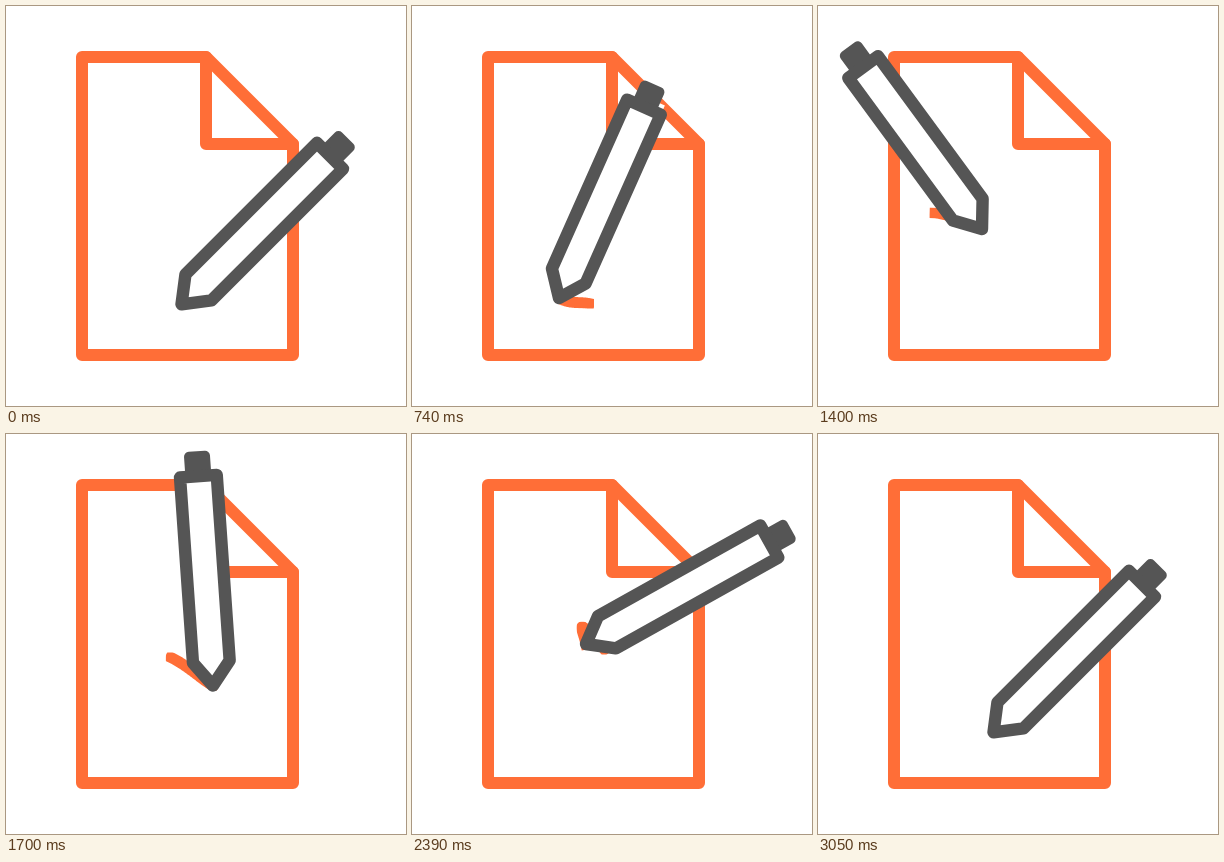
These frames come from a looping animation (400x400 px, 3.08 s). An HTML page with a canvas:

```html
<!DOCTYPE html>
<html>
<head>
<meta charset="utf-8">
<style>
html, body { margin: 0; width: 100%; height: 100%; overflow: hidden; background: #fff; }
canvas { display: block; width: 400px; height: 400px; }
</style>
</head>
<body>
<canvas id="stage" width="400" height="400"></canvas>
<script>
const ctx = document.getElementById('stage').getContext('2d');
const ORANGE = '#ff6e37', GREY = '#555';
const LOOP = 3080, START = 530, END = 3050, STEP = 30;
const INK_LENGTH = 50, INK_WIDTH = 11, INK_MARGIN = 5;

// turning points of the pen: time, tip x, tip y, angle in degrees
const keys = [
  [START, 177, 297.6, 45.2],
  [740, 147, 292, 66],
  [920, 121.5, 264, 87.7],
  [1050, 107, 233, 104],
  [1180, 112, 207, 115],
  [1400, 164, 223, 126.3],
  [1730, 209, 252, 90],
  [2000, 198, 223, 47.5],
  [2210, 171, 193, 33],
  [2390, 174, 210, 29.2],
  [2560, 181, 243, 28.4],
  [2780, 168, 290, 33],
  [END, 175.5, 298.3, 45]
];

function slope(i, c) {
  const a = keys[Math.max(i - 1, 0)], b = keys[Math.min(i + 1, keys.length - 1)];
  return (b[c] - a[c]) / (b[0] - a[0]);
}

// smooth curve through the keys, gives [x, y, angle]
function pose(t) {
  let i = 0;
  while (i < keys.length - 2 && t >= keys[i + 1][0]) i++;
  const a = keys[i], b = keys[i + 1], d = b[0] - a[0];
  const u = (t - a[0]) / d, u2 = u * u, u3 = u2 * u;
  return [1, 2, 3].map(c =>
    a[c] * (2 * u3 - 3 * u2 + 1) + b[c] * (3 * u2 - 2 * u3)
    + d * (slope(i, c) * (u3 - 2 * u2 + u) + slope(i + 1, c) * (u3 - u2)));
}

// the barrel is foreshortened while the pen leans left
function barrel(t) {
  return 186 - 26 * Math.exp(-(((t - 1160) / 235) ** 2));
}

function trace(points, close) {
  ctx.beginPath();
  points.forEach(([x, y]) => ctx.lineTo(x, y));
  if (close) ctx.closePath();
}

function drawPage() {
  ctx.strokeStyle = ORANGE;
  ctx.lineWidth = 12;
  ctx.lineCap = ctx.lineJoin = 'round';
  trace([[76, 51], [200, 51], [287, 138], [287, 349], [76, 349]], true);
  ctx.stroke();
  trace([[200, 51], [200, 138], [287, 138]]);
  ctx.stroke();
}

// the last stretch of the tip's path, cut off by its own bounding box
function drawInk(t) {
  const limit = Math.min(INK_LENGTH, (END - t) * 0.2);
  const points = [pose(t)];
  let length = 0;
  for (let s = t - 5; s >= START && length < limit; s -= 5) {
    const [px, py] = points[points.length - 1], p = pose(s);
    length += Math.hypot(p[0] - px, p[1] - py);
    points.push(p);
  }
  if (points.length < 2) return;
  const xs = points.map(p => p[0]), ys = points.map(p => p[1]);
  const left = Math.min(...xs) - INK_MARGIN, top = Math.min(...ys) - INK_MARGIN;
  ctx.save();
  ctx.beginPath();
  ctx.rect(left, top, Math.max(...xs) + INK_MARGIN - left, Math.max(...ys) + INK_MARGIN - top);
  ctx.clip();
  ctx.strokeStyle = ORANGE;
  ctx.lineWidth = INK_WIDTH;
  ctx.lineCap = 'square';
  trace(points);
  ctx.stroke();
  ctx.restore();
}

function drawPen([x, y, angle], len) {
  const half = 18.4, neck = 24, end = neck + len;
  ctx.save();
  ctx.translate(x, y);
  ctx.rotate(-angle * Math.PI / 180);
  ctx.fillStyle = '#fff';
  ctx.fillRect(end - 2, -half, 12, 2 * half);
  ctx.fillStyle = GREY;
  ctx.beginPath();
  ctx.roundRect(end - 4, -13, 29, 26, 5);
  ctx.fill();
  ctx.fillStyle = '#fff';
  ctx.strokeStyle = GREY;
  ctx.lineWidth = 12.4;
  ctx.lineJoin = 'round';
  trace([[0, 0], [neck, -half], [end, -half], [end, half], [neck, half]], true);
  ctx.fill();
  ctx.stroke();
  ctx.restore();
}

function draw(now) {
  const time = now % LOOP;
  const t = START + Math.floor((time - START) / STEP + 1e-6) * STEP;
  const moving = t >= START && t < END;
  ctx.fillStyle = '#fff';
  ctx.fillRect(0, 0, 400, 400);
  drawPage();
  if (moving) drawInk(t);
  const at = moving ? t : END;
  drawPen(pose(at), barrel(at));
}

const origin = performance.now();
function tick() {
  draw(performance.now() - origin);
  requestAnimationFrame(tick);
}
tick();
</script>
</body>
</html>
```
